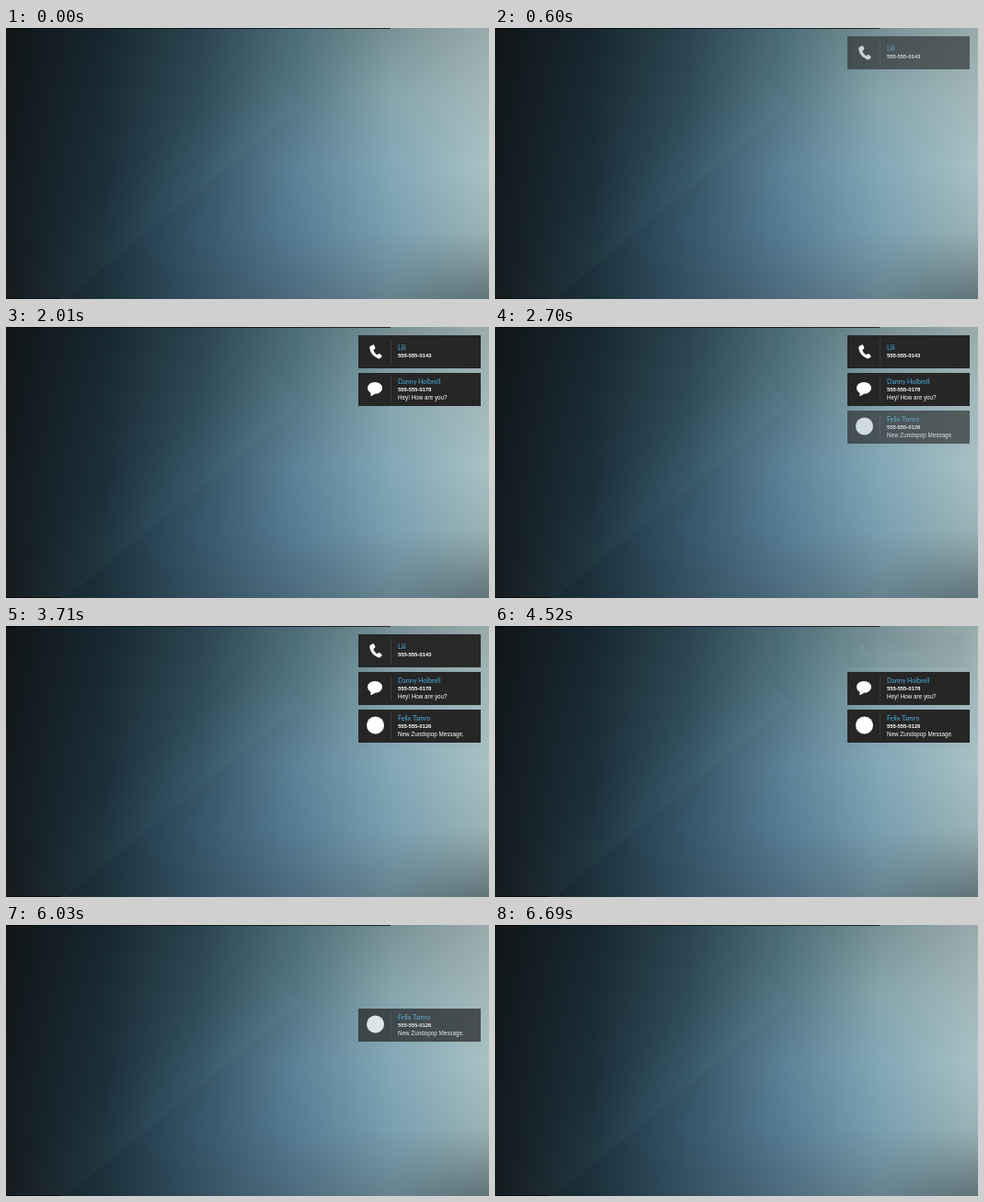
An HTML page with a canvas that plays this animation: 525 by 295 pixels, repeating every 6.89 s.

```html
<!DOCTYPE html>
<html lang="en">
<head>
<meta charset="utf-8">
<title>Notifications</title>
<style>
  html, body { margin: 0; width: 100%; height: 100%; overflow: hidden; background: #12191e; }
  canvas, svg { position: absolute; left: 0; top: 0; width: 525px; height: 295px; display: block; }
  .box { fill: #262626; }
  .rule { fill: #3b3b3b; }
  .icon { fill: #fff; }
  text { fill: #fff; white-space: pre; }
  .name { font: 7.1px Lato, sans-serif; fill: #4fade0; }
  .num { font: bold 6px "Liberation Sans", Arial, sans-serif; letter-spacing: -.1px; }
  .msg { font: 6.3px "Liberation Sans", Arial, sans-serif; }
</style>
</head>
<body>
<canvas id="sky" width="525" height="295"></canvas>
<svg viewBox="0 0 525 295">
  <defs>
    <linearGradient id="sheen" gradientUnits="userSpaceOnUse" x1="192" y1="190" x2="150" y2="139">
      <stop offset="0" stop-color="#9cc" stop-opacity=".035"/>
      <stop offset="1" stop-color="#9cc" stop-opacity="0"/>
    </linearGradient>
  </defs>
  <path d="M65 295L320 85L270 30L0 250V295Z" fill="url(#sheen)"/>
  <path d="M0 0H418V1H0ZM0 294H60V295H0Z" fill="#05080a" fill-opacity=".75"/>

  <g class="card" transform="translate(383 9)">
    <rect class="box" width="133" height="36"/>
    <rect class="rule" x="35" y="4" width="1" height="28"/>
    <path class="icon" d="M13.5 11.5L16 10.2Q17 10 17.3 11L18.3 13.6Q18.5 14.6 17.7 15L16.2 16Q17.4 19.4 20.4 21.4L21.8 20.3Q22.5 19.8 23.3 20.3L25.4 22Q26 22.7 25.4 23.4L23.8 25Q22.8 25.7 21.4 25.2Q13.5 22 12.2 14Q12 12.3 13.5 11.5Z"/>
    <text class="name" x="43" y="15.8">Lili</text>
    <text class="num" x="43" y="24">555-555-0143</text>
  </g>

  <g class="card" transform="translate(383 50)">
    <rect class="box" width="133" height="36"/>
    <rect class="rule" x="35" y="4" width="1" height="28"/>
    <ellipse class="icon" cx="18" cy="16.4" rx="8" ry="6.4"/>
    <path class="icon" d="M12.8 20.5Q14.2 23.3 13.2 25.3Q17 24.5 18.5 22Z"/>
    <text class="name" x="43" y="11.8">Danny Holbrell</text>
    <text class="num" x="43" y="20.1">555-555-0178</text>
    <text class="msg" x="43" y="28.9">Hey! How are you?</text>
  </g>

  <g class="card" transform="translate(383 91)">
    <rect class="box" width="133" height="36"/>
    <rect class="rule" x="35" y="4" width="1" height="28"/>
    <circle class="icon" cx="18.5" cy="17" r="9.5"/>
    <text class="name" x="43" y="11.8">Felix Tamro</text>
    <text class="num" x="43" y="20.1">555-555-0126</text>
    <text class="msg" x="43" y="28.9">New Zundopop Message.</text>
  </g>
</svg>
<script>
  const LOOP = 6890, FADE = 850;
  const cards = document.querySelectorAll('.card');

  // Backdrop: horizontal gradients blended from one band to the next.
  const bands = [
    [0, '111517 16262f 2b444f 4c6d77 789196 9aabac'],
    [75, '11171a 192a34 2f4b57 547783 87a6ad a3b8bb'],
    [150, '12191e 1b2e39 345362 5d8298 83a8b6 a9c1c5'],
    [220, '131b20 1c313c 36566a 567c95 7aa0b0 9bb2b6'],
    [295, '14191d 1b303a 345060 4d6b7d 66828d 5f7378']
  ].map(([y, list]) => ({
    y,
    stops: list.split(' ').map(h => [0, 2, 4].map(i => parseInt(h.substr(i, 2), 16)))
  }));

  function paintSky() {
    const ctx = document.getElementById('sky').getContext('2d');
    for (let y = 0; y < 295; y++) {
      const k = bands.findIndex(b => b.y > y);
      const a = bands[k - 1], b = bands[k];
      const mix = (y - a.y) / (b.y - a.y);
      const grad = ctx.createLinearGradient(0, 0, 525, 0);
      a.stops.forEach((c, i) => {
        const rgb = c.map((v, j) => v + (b.stops[i][j] - v) * mix);
        grad.addColorStop(i / (a.stops.length - 1), `rgb(${rgb.map(Math.round)})`);
      });
      ctx.fillStyle = grad;
      ctx.fillRect(0, y, 525, 1);
    }
  }

  const clamp = v => Math.max(0, Math.min(1, v));

  function opacity(i, t) {
    const start = 90 + 1035 * i, leave = 3690 + 1055 * i;
    if (t < leave) return clamp((t - start) / FADE);
    // A faint trace lingers until the next card begins to leave.
    const trace = t < Math.min(leave + 1090, 6690) ? 0.024 : 0;
    return Math.max(trace, clamp(1 - (t - leave) / FADE));
  }

  function render(t) {
    cards.forEach((card, i) => card.setAttribute('opacity', opacity(i, t).toFixed(3)));
  }

  const begin = performance.now();
  function tick() {
    render((performance.now() - begin) % LOOP);
    requestAnimationFrame(tick);
  }

  paintSky();
  render(0);
  requestAnimationFrame(tick);
</script>
</body>
</html>
```
